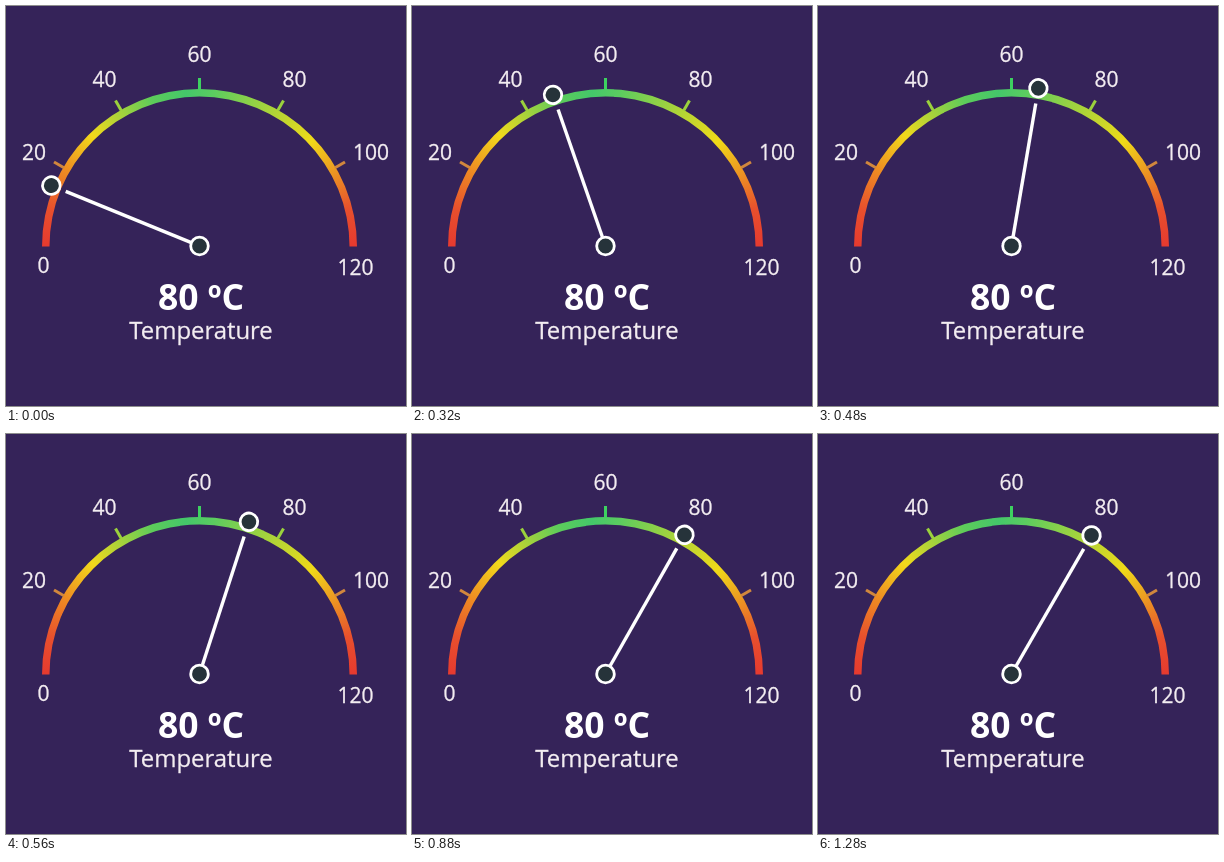
These frames come from a looping animation (400 px wide and 400 px high, 8000 ms). An HTML page:

```html
<!DOCTYPE html>
<html lang="en">
<head>
<meta charset="utf-8">
<title>Temperature gauge</title>
<style>
  html, body { margin: 0; width: 100%; height: 100%; overflow: hidden; background: #352359; }
  .stage { position: relative; width: 400px; height: 400px; overflow: hidden; }
  .arc {
    position: absolute; inset: 0;
    background: conic-gradient(from -90deg at 193.5px 240px,
      #e63a2f, #e8502d 14deg, #ee8e22 30deg, #f2d91b 46deg, #5dcc5a 72deg,
      #44c76a 85deg, #5acc60 95deg, #f0da18 137deg, #e8502d 166deg, #e63a2f 180deg);
    clip-path: path("M36 240.5 A157.5 157.5 0 0 1 351 240.5 H343.5 A150 150 0 0 0 43.5 240.5 Z");
  }
  svg { position: absolute; inset: 0; }
  text {
    font: 21px "Open Sans", sans-serif;
    text-anchor: middle; fill: #f3edf1; stroke: #f3edf1; stroke-width: .3;
  }
  .left { text-anchor: end; }
  .right { text-anchor: start; }
  .title { font-size: 23.9px; }
  .value { font-size: 35.5px; font-weight: 700; fill: #fff; stroke: none; }
  circle { fill: #26333a; stroke: #fff; stroke-width: 2.8; }
</style>
</head>
<body>
<div class="stage">
  <div class="arc"></div>
  <svg width="400" height="400" viewBox="0 0 400 400">
    <g id="ticks" stroke-width="3"></g>
    <text x="37.5" y="267">0</text>
    <text class="left" x="40" y="154">20</text>
    <text class="left" x="110.5" y="81">40</text>
    <text x="193.5" y="56">60</text>
    <text class="right" x="276.5" y="81">80</text>
    <text class="right" x="347" y="154">100</text>
    <text x="349.5" y="269">120</text>
    <text class="value" x="195" y="304">80 ºC</text>
    <text class="title" x="195" y="332.5">Temperature</text>
    <g id="needle">
      <path d="M49 240H184" stroke="#fff" stroke-width="3.4"/>
      <circle cx="33.5" cy="240" r="8.8"/>
    </g>
    <circle cx="193.5" cy="240" r="8.8"/>
  </svg>
</div>
<script>
  const LOOP = 8000, STEP = 80, SPEED_UP = 320, STOP = 1128;
  const needle = document.getElementById("needle");
  const ticks = document.getElementById("ticks");
  const turn = angle => `rotate(${angle} 193.5 240)`;

  for (let i = 1; i <= 5; i++) {
    const tick = document.createElementNS("http://www.w3.org/2000/svg", "path");
    tick.setAttribute("d", "M25.5 240H37");
    tick.setAttribute("stroke", `hsl(${134 - 52 * Math.abs(i - 3)} 62% 53%)`);
    tick.setAttribute("transform", turn(30 * i));
    ticks.append(tick);
  }

  // Degrees from the left: steady acceleration, then a quartic ease-out to 120.
  function needleAngle(t) {
    if (t < SPEED_UP) return 22.2 + 0.0794 * t + 0.000227 * t * t;
    const left = Math.max(0, STOP - t) / 1010;
    return 120 * (1 - left ** 4);
  }

  function draw() {
    const time = performance.now() % LOOP;
    needle.setAttribute("transform", turn(needleAngle(time - time % STEP)));
    requestAnimationFrame(draw);
  }
  draw();
</script>
</body>
</html>
```
